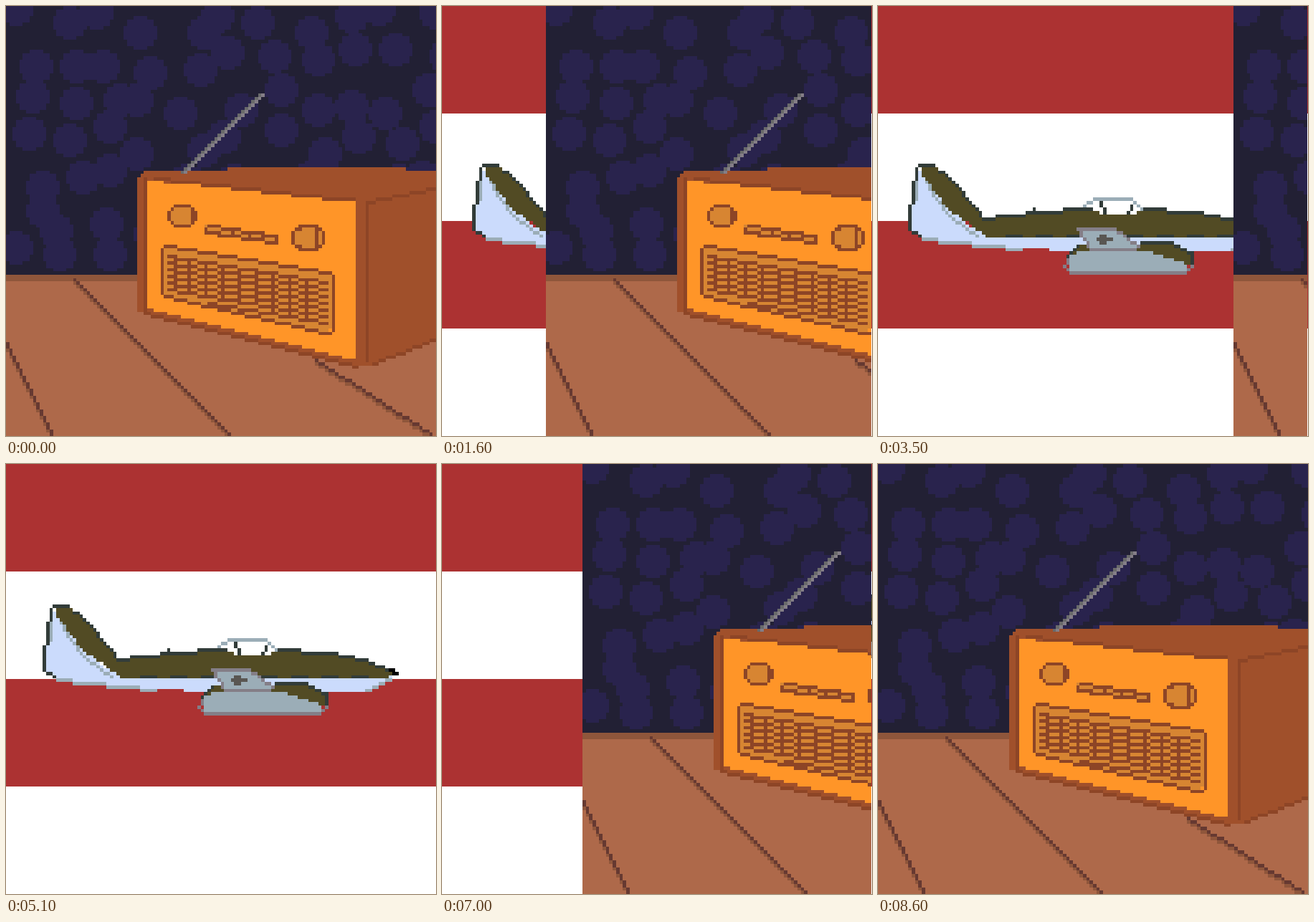
An HTML page with a canvas for the animation above (8.7 s loop, 600 px wide and 600 px high).

```html
<!DOCTYPE html>
<html lang="en">
<head>
<meta charset="utf-8">
<title>Radio and plane</title>
<style>
  html, body { margin: 0; width: 100%; height: 100%; overflow: hidden; background: #fff; }
  canvas { display: block; width: 600px; height: 600px; }
</style>
</head>
<body>
<canvas id="stage" width="600" height="600"></canvas>
<script>
const N = 128, SIZE = 600, CELL = SIZE / N, LOOP = 8700;
const stage = document.getElementById('stage').getContext('2d');
stage.imageSmoothingEnabled = false;

// Hard-edged drawing on a 128 x 128 cell layer
function layer() {
  const canvas = document.createElement('canvas');
  canvas.width = canvas.height = N;
  const c = canvas.getContext('2d');
  const rect = (color, x, y, w = 1, h = 1) => {
    c.fillStyle = color;
    c.fillRect(x, y, w, h);
  };
  const poly = (color, ...pts) => {
    for (let y = 0; y < N; y++) {
      const cy = y + 0.5, xs = [];
      pts.forEach(([x1, y1], i) => {
        const [x2, y2] = pts[(i + 1) % pts.length];
        if ((y1 <= cy) !== (y2 <= cy)) xs.push(x1 + (cy - y1) / (y2 - y1) * (x2 - x1));
      });
      xs.sort((a, b) => a - b);
      for (let i = 0; i + 1 < xs.length; i += 2) {
        const a = Math.round(xs[i]), b = Math.round(xs[i + 1]);
        if (b > a) rect(color, a, y, b - a, 1);
      }
    }
  };
  const line = (color, ...pts) => {
    for (let i = 0; i + 1 < pts.length; i++) {
      const [x1, y1] = pts[i], [x2, y2] = pts[i + 1];
      const n = Math.max(Math.abs(x2 - x1), Math.abs(y2 - y1), 1);
      for (let s = 0; s <= n; s++) {
        rect(color, Math.round(x1 + (x2 - x1) * s / n), Math.round(y1 + (y2 - y1) * s / n));
      }
    }
  };
  const oval = (color, cx, cy, rx, ry = rx) => {
    for (let y = Math.floor(cy - ry); y < cy + ry; y++) {
      for (let x = Math.floor(cx - rx); x < cx + rx; x++) {
        if (((x + 0.5 - cx) / rx) ** 2 + ((y + 0.5 - cy) / ry) ** 2 <= 1.02) rect(color, x, y);
      }
    }
  };
  return { canvas, rect, poly, line, oval };
}

function seeded(seed) {
  return () => (seed = seed * 16807 % 2147483647) / 2147483647;
}

function drawRoom() {
  const { canvas, rect, poly, line, oval } = layer();
  const body = '#a0502b', dark = '#8d4526', tan = '#d78532', face = '#ff9528';

  // Wallpaper: round spots on a loose grid
  const rand = seeded(47);
  const jitter = () => Math.round((rand() - 0.5) * 9);
  rect('#222034', 0, 0, N, N);
  for (let y = 4; y < 80; y += 12) {
    for (let x = 7; x < N + 5; x += 12) oval('#29234d', x + jitter(), Math.min(y + jitter(), 74), 5);
  }

  // Table
  const seam = (x1, y1, x2, y2) => {
    line('#8f563b', [x1, y1 + 1], [x2, y2 + 1]);
    line('#663931', [x1, y1], [x2, y2]);
  };
  rect('#ae694a', 0, 80, N, 48);
  rect('#8f563b', 0, 80, N, 2);
  seam(20, 81, 66, 127);
  seam(0, 100, 13, 127);
  seam(92, 105, 126, 127);

  // Cabinet
  poly(body, [39, 51], [42, 49], [66, 49], [66, 48], [119, 48], [119, 49], [128, 49],
    [128, 99.5], [110, 106.5], [104, 107.5], [39, 91]);
  line(dark, [41, 91], [104, 107]);
  line(dark, [109, 106], [127, 99]);
  line(dark, [41, 51], [41, 90]);
  poly(face, [42, 52], [104, 58], [104, 105.4], [42, 90]);
  line(dark, [44, 51], [98, 57], [103, 57]);
  line(dark, [107, 105], [107, 58], [127, 54]);

  // Knobs
  const knob = (x, y, rx, ry) => {
    oval(dark, x, y, rx, ry);
    oval(tan, x, y, rx - 1, ry - 1);
    line(dark, [x + 2, y - ry + 2], [x + 2, y + ry - 2]);
  };
  knob(52.5, 62.5, 4.6, 3.6);
  knob(90, 69, 5, 4.1);

  // Dial
  poly(tan, [59, 65], [81, 68], [81, 71], [59, 68]);
  line(dark, [60, 65], [80, 68]);
  line(dark, [59, 67], [80, 70]);
  for (let i = 0; i < 6; i++) rect(dark, Math.round(59 + i * 4.2), Math.round(66 + i * 0.6));

  // Grille
  const frame = [[47, 71], [96, 79], [97, 80], [97, 96], [95, 97], [47, 86], [46, 85], [46, 72], [47, 71]];
  const drop = x => (x - 48) * 8 / 47;
  poly(tan, ...frame);
  line(dark, ...frame);
  for (let i = 0; i < 7; i++) {
    const y = 74 + i * 2, x = i < 6 ? 48 : 60;
    line(dark, [x, y + drop(x)], [95, y + drop(95)]);
  }
  for (let i = 0; i < 9; i++) {
    const x = Math.round(49.5 + i * 4.95);
    line(dark, [x, 74 + drop(x)], [x, 84 + drop(x) * 1.2]);
  }

  // Antenna
  line('#696a6a', [52, 49], [75, 26]);
  line('#847e87', [53, 49], [76, 26]);
  return canvas;
}

function drawPlane() {
  const { canvas, rect, poly, line } = layer();
  const olive = '#524b24', dark = '#323c39', sky = '#cbdbfc', steel = '#9badb7', grey = '#847e87';

  // Belly and fin
  const keel = [[13, 69], [33, 71], [42, 72], [60, 73]];
  poly(sky, [11, 48], [13, 49], [17, 56], [27, 66], [114, 68], [104, 73], ...keel.slice().reverse(),
    [10, 67], [10, 60]);
  line(steel, [11, 49], [11, 57]);
  line(steel, ...keel.slice(0, 3));
  line(steel, [105, 72], [112, 69]);

  // Upper hull
  const ridge = [[13, 47], [16, 47], [21, 51], [28, 59], [31, 63], [38, 62], [60, 60], [78, 60],
    [94, 61], [104, 63], [112, 66]];
  poly(olive, ...ridge, [113, 68], [110, 69], [43, 69], [32, 68.5], [21, 60.5], [13, 50]);
  line(steel, [14, 52], [16, 56], [22, 63], [29, 68]);
  line(dark, ...ridge);
  rect(olive, 15, 48, 3, 2);
  rect(dark, 46, 60, 1, 2);
  line(dark, [12, 47], [11, 48], [9, 62], [9, 66], [12, 68]);
  for (let x = 38; x < 108; x += 9) rect(dark, x, 68, 5, 1);
  rect('#000', 112, 66, 2, 1);
  rect('#000', 113, 67, 2, 1);

  // Canopy
  const glass = [[61, 59], [64, 57], [75, 57], [78, 60]];
  poly('#fff', ...glass, [76, 62], [67, 62]);
  line(steel, ...glass);
  line(dark, [66, 58], [67, 61]);
  line(dark, [75, 59], [74, 61]);

  // Engine
  const cowl = [[78, 70], [86, 70], [93, 73], [93, 77]];
  poly(olive, [56, 75], [59, 71], [63, 71], [63, 73]);
  poly(olive, [76, 73], ...cowl, [80, 74]);
  line(dark, [56, 74], [59, 71]);
  line(dark, ...cowl);
  poly(steel, [56, 75], [60, 73], [80, 73], [87, 75], [92, 77], [92, 79], [57, 79]);
  line(grey, [56, 75], [55, 77], [57, 79], [91, 79], [93, 77]);

  // Wing
  const wing = [[59, 66], [70, 66], [77, 71], [76, 72], [63, 72], [59, 66]];
  poly(steel, ...wing);
  line(grey, ...wing);
  rect('#595652', 65, 69, 5, 1);
  rect('#595652', 66, 68, 2, 3);
  return canvas;
}

// Key poses in cells: step, x, y
const ROOM = [[0, 0, 0], [9, 22, 0], [18, 49, 0], [21, 64, 0], [31, 106, 0], [36, 128, 0],
  [48, 128, 0], [66, 42, 0], [72, 25, 0], [82, 0, 0]];
const PLANE = [[34, 0, 0], [40, 1, 1], [47, 2, -5], [54, 12, -10], [66, 40, -22]];

function pose(keys, step) {
  const last = keys[keys.length - 1];
  const s = Math.min(Math.max(step, keys[0][0]), last[0]);
  const i = Math.max(1, keys.findIndex(k => k[0] >= s));
  const a = keys[i - 1], b = keys[i], f = (s - a[0]) / (b[0] - a[0]);
  return [1, 2].map(n => Math.round(a[n] + (b[n] - a[n]) * f));
}

const room = drawRoom(), plane = drawPlane();

function render(now) {
  const t = now % LOOP;
  const step = t < 500 ? 0 : Math.floor((t - 400) / 100);
  for (let i = 0; i < 4; i++) {
    stage.fillStyle = i % 2 ? '#fff' : '#ac3232';
    stage.fillRect(0, i * 150, SIZE, 150);
  }
  const [px, py] = pose(PLANE, step);
  stage.drawImage(plane, Math.floor(px * CELL), Math.floor(py * CELL), SIZE, SIZE);
  const [x] = pose(ROOM, step), w = N - x;
  if (w > 0) {
    stage.drawImage(room, 0, 0, w, N, Math.floor(x * CELL), 0, Math.floor(w * CELL), SIZE);
  }
}

const start = performance.now();
function tick() {
  render(performance.now() - start);
  requestAnimationFrame(tick);
}
tick();
</script>
</body>
</html>
```
